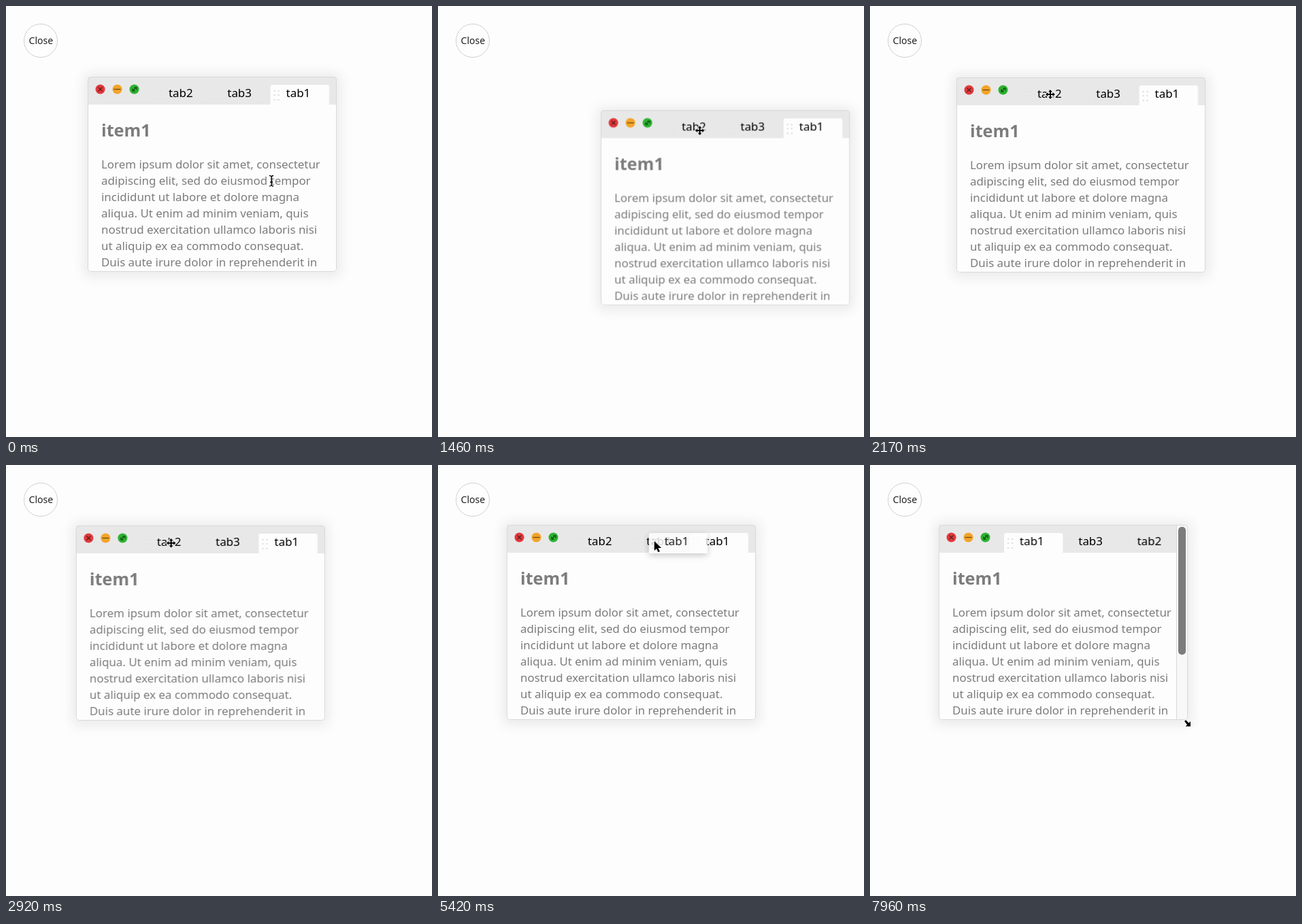
An HTML page that plays this animation: 626 by 634 pixels, repeating every 8 s.

```html
<!DOCTYPE html>
<html lang="en">
<head>
<meta charset="utf-8">
<title>Draggable tab window</title>
<style>
  :root { --paper: #fdfdfd; --bar: #e8e8e8; --ink: #7c7c7c; --edge: #d9d9d9; }
  html, body { margin: 0; width: 100%; height: 100%; overflow: hidden; background: var(--paper); }
  svg { display: block; width: 626px; height: 634px; }
  text { font-family: "Noto Sans", sans-serif; font-size: 16.9px; }
  .body, .title { fill: var(--ink); }
  .title { font-size: 25.2px; font-weight: 600; }
  .close { font-size: 14.1px; fill: #222; }
  .face, .page { fill: var(--paper); }
  .bar { fill: var(--bar); }
  .edge { fill: none; stroke: var(--edge); }
  .grip { fill: #dedede; }
  .glow { fill: #000; opacity: .07; filter: blur(9px); }
  .sign { fill: none; stroke: #000; stroke-opacity: .55; stroke-width: 1.3; }
  .lift { filter: drop-shadow(0 3px 5px rgba(0, 0, 0, .25)); }

  .window { animation: window 8s linear infinite; }
  .pointer { animation: pointer 8s linear infinite; }
  .first, .third, .ghost, .scroll, .tab1, .tab2,
  .ibeam, .move, .arrow, .resize { animation: 8s step-end infinite; }
  .first { animation-name: first; }
  .third { animation-name: third; }
  .ghost { animation-name: ghost; }
  .scroll { animation-name: scroll; }
  .tab1 { animation-name: tab1; }
  .tab2 { animation-name: tab2; }
  .tab3 { transform: translate(182.3px, 12px); }
  .ibeam { animation-name: ibeam; }
  .move { animation-name: move; }
  .arrow { animation-name: arrow; }
  .resize { animation-name: resize; }

  @keyframes window {
    0%, 10.5% { transform: translate(120px, 104px); }
    12.5% { transform: translate(150px, 104px); }
    15.125% { transform: translate(211px, 115px); }
    18% { transform: translate(240px, 150px); }
    20.6% { transform: translate(232px, 183px); }
    21.875% { transform: translate(149px, 186px); }
    24% { transform: translate(106px, 150px); }
    27.125% { transform: translate(127px, 105px); }
    31.5% { transform: translate(127px, 104px); }
    34% { transform: translate(112px, 94px); }
    37%, 100% { transform: translate(101px, 88px); }
  }
  @keyframes pointer {
    0%, 1% { transform: translate(390px, 257px); }
    3% { transform: translate(352px, 212px); }
    5% { transform: translate(288px, 151px); }
    7%, 10.5% { transform: translate(262px, 131px); }
    12.5% { transform: translate(299px, 136px); }
    15.125% { transform: translate(362px, 148px); }
    18% { transform: translate(386px, 180px); }
    20.6% { transform: translate(373px, 211px); }
    21.875% { transform: translate(290px, 214px); }
    24% { transform: translate(245px, 176px); }
    27.125% { transform: translate(265px, 130px); }
    31.5% { transform: translate(265px, 129px); }
    34% { transform: translate(251px, 119px); }
    37%, 39.5% { transform: translate(241px, 114px); }
    43%, 47% { transform: translate(328px, 114px); }
    51.6%, 53% { transform: translate(421px, 130px); }
    57%, 63% { transform: translate(378px, 112px); }
    67% { transform: translate(330px, 112px); }
    72% { transform: translate(250px, 112px); }
    76%, 82.5% { transform: translate(208px, 112px); }
    85% { transform: translate(240px, 140px); }
    89% { transform: translate(370px, 275px); }
    93.5%, 100% { transform: translate(467px, 380px); }
  }
  @keyframes first { 0%, 60% { opacity: 1; } 44% { opacity: 0; } }
  @keyframes third { 0%, 60% { opacity: 0; } 44% { opacity: 1; } }
  @keyframes ghost { 0%, 82% { opacity: 0; } 63% { opacity: .85; } }
  @keyframes scroll { 0% { opacity: 0; } 93.5%, 100% { opacity: 1; } }
  @keyframes tab1 {
    0% { transform: translate(268.6px, 12px); }
    82%, 100% { transform: translate(96px, 12px); }
  }
  @keyframes tab2 {
    0% { transform: translate(96px, 12px); }
    82%, 100% { transform: translate(268.6px, 12px); }
  }
  @keyframes ibeam { 0%, 85.5% { opacity: 1; } 5%, 93%, 100% { opacity: 0; } }
  @keyframes move { 0%, 39.5%, 100% { opacity: 0; } 5% { opacity: 1; } }
  @keyframes arrow { 0%, 85.5%, 100% { opacity: 0; } 39.5% { opacity: 1; } }
  @keyframes resize { 0% { opacity: 0; } 93%, 100% { opacity: 1; } }
</style>
</head>
<body>
<svg viewBox="0 0 626 634">
  <defs>
    <path id="face" d="M0 30V3q0-3 3-3H83.3q3 0 3 3V30z"/>
    <path id="grip" d="M5 8h2v2h-2zm6 0h2v2h-2zM5 14h2v2h-2zm6 0h2v2h-2zM5 21h2v2h-2zm6 0h2v2h-2z"/>
  </defs>

  <circle cx="51" cy="51" r="24.5" fill="#fefefe" stroke="#d0d0d0"/>
  <text class="close" x="33.5" y="56">Close</text>

  <g class="window">
    <rect class="glow" x="-6" y="-5" width="378" height="300" rx="8"/>
    <rect class="page" width="366" height="287" rx="4"/>
    <path class="bar" d="M0 41V4q0-4 4-4H362q4 0 4 4V41z"/>

    <circle cx="18.5" cy="18.5" r="7" fill="#e0393c"/>
    <path class="sign" d="M15.5 15.5l6 6m0-6l-6 6"/>
    <circle cx="43.5" cy="18.5" r="7" fill="#f4a428"/>
    <path class="sign" d="M38.5 18.5h10"/>
    <circle cx="68.5" cy="18.5" r="7" fill="#2cb330"/>
    <path class="sign" d="M66 21l5-5m-5 1.5v3.5h3.5m-1-5h3.5v3.5"/>

    <g class="tab2">
      <use class="grip" href="#grip" opacity=".35"/>
      <text x="23" y="18">tab2</text>
    </g>
    <g class="tab3">
      <use class="face third" href="#face"/>
      <use class="grip" href="#grip" opacity=".35"/>
      <use class="grip third" href="#grip"/>
      <text x="23" y="18">tab3</text>
    </g>
    <g class="tab1">
      <use class="face first" href="#face"/>
      <use class="grip" href="#grip" opacity=".35"/>
      <use class="grip first" href="#grip"/>
      <text x="23" y="18">tab1</text>
    </g>

    <text class="title first" x="20" y="88">item1</text>
    <text class="title third" x="20" y="88">item3</text>
    <text class="body">
      <tspan x="20" y="135">Lorem ipsum dolor sit amet, consectetur</tspan>
      <tspan x="20" y="159">adipiscing elit, sed do eiusmod tempor</tspan>
      <tspan x="20" y="183">incididunt ut labore et dolore magna</tspan>
      <tspan x="20" y="207">aliqua. Ut enim ad minim veniam, quis</tspan>
      <tspan x="20" y="231">nostrud exercitation ullamco laboris nisi</tspan>
      <tspan x="20" y="255">ut aliquip ex ea commodo consequat.</tspan>
      <tspan x="20" y="279">Duis aute irure dolor in reprehenderit in</tspan>
    </text>

    <g class="scroll">
      <path d="M349 0H362q4 0 4 4V283q0 4-4 4H349z" fill="#f8f8f8"/>
      <path class="edge" d="M349.5 0V287"/>
      <rect x="352" y="3" width="11" height="188" rx="5" fill="#7c7c7c"/>
    </g>
    <rect class="edge" x=".5" y=".5" width="365" height="286" rx="4"/>
  </g>

  <g class="pointer">
    <g class="ghost">
      <g class="lift" transform="translate(-8 -12)">
        <use class="face" href="#face"/>
        <use class="grip" href="#grip"/>
        <text x="23" y="18">tab1</text>
      </g>
    </g>
    <path class="ibeam" d="M-3-7.5q3 0 3 2.5q0-2.5 3-2.5M0-5V6M-3 8q3 0 3-2.5q0 2.5 3 2.5M-2 2h4" fill="none" stroke="#000" stroke-width="1.3"/>
    <path class="move" d="M0-7l3 3.5h-2v2.5h2.5v-2l3.5 3l-3.5 3v-2h-2.5v2.5h2l-3 3.5l-3-3.5h2v-2.5h-2.5v2l-3.5-3l3.5-3v2h2.5v-2.5h-2z" fill="#000" stroke="#fff" stroke-width="2" paint-order="stroke"/>
    <path class="arrow" d="M0 0V14l3.3-3l2.3 5.3l2.5-1.1l-2.3-5.2h4.6z" fill="#000" stroke="#fff" stroke-width="1.5" paint-order="stroke"/>
    <path class="resize" d="M-5-3l2-2l4.5 4.5l2.5-2.5v7.5h-7.5l2.5-2.5z" fill="#000" stroke="#fff" stroke-width="1.5" paint-order="stroke"/>
  </g>
</svg>
</body>
</html>
```
